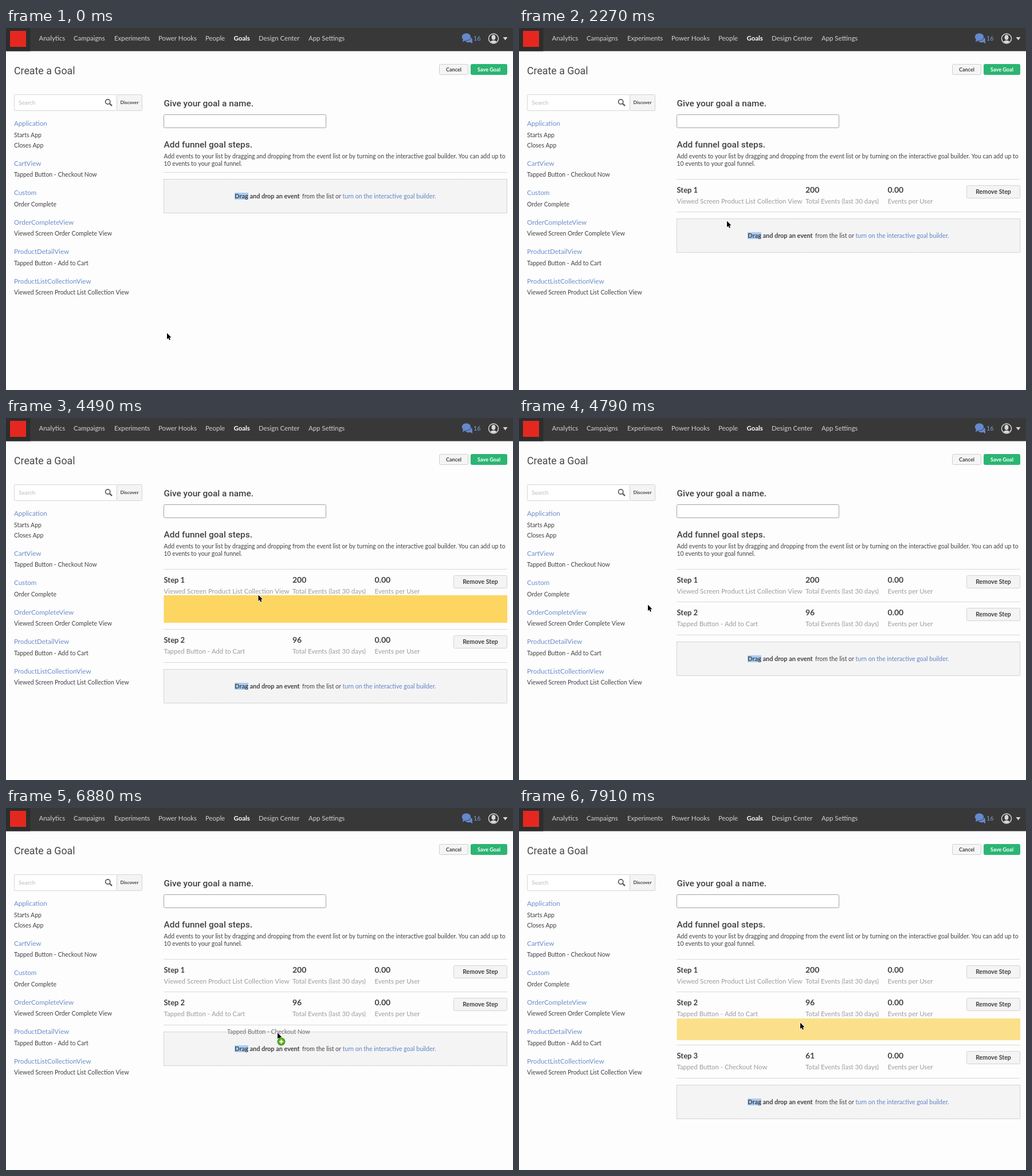
Recreate the animation shown at these times as an HTML page with a canvas. Size 885 by 633 pixels, loop 8000 ms.

```html
<!DOCTYPE html>
<html lang="en">
<head>
<meta charset="utf-8">
<title>Create a Goal</title>
<style>
html, body { margin: 0; width: 100%; height: 100%; overflow: hidden; background: #fdfdfd; }
canvas { display: block; width: 885px; height: 633px; }
</style>
</head>
<body>
<canvas id="stage"></canvas>
<script>
const W = 885, H = 633, LOOP = 8000;
const BEAT = 145; // the picture updates once per beat while something moves
const GAP = 48;   // full height of the opened slot
const canvas = document.getElementById('stage');
const ctx = canvas.getContext('2d');
const dpr = window.devicePixelRatio || 1;
canvas.width = W * dpr;
canvas.height = H * dpr;

const LATO = 'Lato, "Open Sans", sans-serif';
const ROBOTO = 'Roboto, "Liberation Sans", sans-serif';
const INK = '#414141', GREY = '#9c9c9c', LINK = '#5f83c6', RULE = '#d9d9d9';
const BODY = 10.45;

const LIST_VIEW = 'Viewed Screen Product List Collection View';
const ADD_CART = 'Tapped Button - Add to Cart';
const CHECKOUT = 'Tapped Button - Checkout Now';

const nav = [
  ['Analytics', 57.5], ['Campaigns', 118], ['Experiments', 189], ['Power Hooks', 266],
  ['People', 348], ['Goals', 397.5], ['Design Center', 441], ['App Settings', 528]
];
const sidebar = [
  ['Application', 'Starts App', 'Closes App'],
  ['CartView', CHECKOUT],
  ['Custom', 'Order Complete'],
  ['OrderCompleteView', 'Viewed Screen Order Complete View'],
  ['ProductDetailView', ADD_CART],
  ['ProductListCollectionView', LIST_VIEW]
];

// Each event is dragged from grab to drop, held at (dx, dy) from the pointer.
const steps = [
  { event: LIST_VIEW, total: 200, grab: 1240, drop: 1675, dx: -141, dy: -3 },
  { event: ADD_CART, total: 96, grab: 3460, drop: 4490, dx: -111.5, dy: 11 },
  { event: CHECKOUT, total: 61, grab: 5980, drop: 7900, dx: -87.5, dy: -1.5 }
];

// Pointer stops: reached in a number of beats, starting at a time.
const home = { x: 280.5, y: 533 };
const moves = [
  { at: 150, beats: 5, x: 155, y: 465 },
  { at: 1240, beats: 4, x: 489, y: 302 },
  { at: 2270, beats: 7, x: 106, y: 408 },
  { at: 3460, beats: 6, x: 440, y: 309 },
  { at: 4635, beats: 2, x: 224.5, y: 326 },
  { at: 4925, beats: 5, x: 101, y: 260 },
  { at: 5980, beats: 3, x: 320, y: 316 },
  { at: 6415, beats: 4, x: 473.5, y: 392.5 },
  { at: 7030, beats: 7, x: 490.5, y: 375 }
];

// The drop slot opens above step number `slot`.
const slots = [
  { open: 1385, close: 1675, slot: 0 },
  { open: 4040, close: 4635, slot: 1 },
  { open: 6270, close: 6705, slot: 1 },
  { open: 7030, close: 7900, slot: 2 }
];

const easeOut = p => 1 - Math.pow(1 - p, 2.6);

function pointerAt(t) {
  let pos = home;
  for (const m of moves) {
    if (t < m.at) break;
    const beat = Math.floor((t - m.at) / BEAT) + 1;
    const p = easeOut(Math.min(1, beat / m.beats));
    pos = { x: pos.x + (m.x - pos.x) * p, y: pos.y + (m.y - pos.y) * p };
  }
  return pos;
}

function gapAt(t, { open, close }) {
  if (t < open + BEAT) return GAP / 6;
  return t < close ? GAP : GAP * .73;
}

function text(str, x, y, size, color = INK, weight = 400, family = LATO, align = 'left') {
  ctx.font = `${weight} ${size}px ${family}`;
  ctx.fillStyle = color;
  ctx.textAlign = align;
  ctx.fillText(str, x, y);
}

function rect(x, y, w, h, color) {
  ctx.fillStyle = color;
  ctx.fillRect(x, y, w, h);
}

function panel(x, y, w, h, fill, stroke, radius = 1) {
  ctx.beginPath();
  ctx.roundRect(x + .5, y + .5, w - 1, h - 1, radius);
  ctx.fillStyle = fill;
  ctx.fill();
  ctx.strokeStyle = stroke;
  ctx.lineWidth = 1;
  ctx.stroke();
}

function button(label, x, y, w, h, size, fill = '#f4f4f4', stroke = '#d3d3d3', color = INK) {
  panel(x, y, w, h, fill, stroke, 2);
  text(label, x + w / 2, y + h / 2 + size * .34, size, color, 700, LATO, 'center');
}

function shape(points, color) {
  ctx.beginPath();
  points.forEach(([x, y]) => ctx.lineTo(x, y));
  ctx.closePath();
  ctx.fillStyle = color;
  ctx.fill();
}

function oval(x, y, rx, ry, color) {
  ctx.beginPath();
  ctx.ellipse(x, y, rx, ry, 0, 0, Math.PI * 2);
  ctx.fillStyle = color;
  ctx.fill();
}

function drawHeader() {
  const bar = '#383838', blue = '#6489cc', pale = '#d8d8d8';
  rect(0, 0, W, 40.5, bar);
  rect(0, 0, 42.5, 40.5, '#2d2d2d');
  rect(7, 5, 28, 28, '#e5281f');
  for (const [label, x] of nav) {
    const on = label === 'Goals';
    text(label, x, 22, 11.4, on ? '#fff' : '#d2d2d2', on ? 700 : 400);
  }

  oval(807.5, 20.5, 6.5, 5, blue);
  shape([[809, 23], [814, 22], [814, 27.5]], blue);
  oval(803.5, 15.5, 8.5, 7, bar);
  oval(803.5, 15.5, 7.7, 6.2, blue);
  shape([[798, 18], [803, 21], [797, 24.5]], blue);
  text('16', 816, 22, 10.8, '#7c9bd6');

  oval(851, 18.5, 9.3, 9.3, pale);
  oval(851, 18.5, 7.8, 7.8, bar);
  ctx.save();
  ctx.beginPath();
  ctx.arc(851, 18.5, 7.8, 0, Math.PI * 2);
  ctx.clip();
  oval(851, 16.5, 3.4, 4.4, pale);
  oval(851, 26, 6.3, 4.3, pale);
  ctx.restore();
  shape([[867.5, 16], [875.5, 16], [871.5, 21.5]], pale);
}

function drawSidebar() {
  text('Create a Goal', 14, 81, 17.8, '#484848', 400, ROBOTO);
  panel(14, 116, 180, 29, '#fff', '#d6d6d6');
  text('Search', 22, 134, 10, '#bcbcbc');
  button('Discover', 193, 116, 45, 29, 8.2);

  ctx.strokeStyle = '#5a5a5a';
  ctx.lineWidth = 1.7;
  ctx.beginPath();
  ctx.arc(177.7, 129, 4.1, 0, Math.PI * 2);
  ctx.stroke();
  ctx.lineWidth = 2.4;
  ctx.beginPath();
  ctx.moveTo(181, 132.3);
  ctx.lineTo(185, 136);
  ctx.stroke();

  let y = 167;
  for (const [title, ...events] of sidebar) {
    text(title, 14, y + 4, 11.6, '#6a8dcb');
    events.forEach((name, i) => text(name, 14, y + 23.7 + i * 18, BODY));
    y += 33.5 + events.length * 18;
  }
}

function drawForm() {
  button('Cancel', 756, 63, 51, 19, 9, '#f5f5f5', '#d0d0d0');
  button('Save Goal', 811, 63, 64, 19, 9.1, '#2bb573', '#2bb573', '#fff');

  text('Give your goal a name.', 275.5, 136.5, 15.4, INK, 500, ROBOTO);
  panel(275, 151, 284, 24, '#fff', '#a3a3a3', 2);
  text('Add funnel goal steps.', 275.5, 208.5, 15.4, INK, 500, ROBOTO);
  text('Add events to your list by dragging and dropping from the event list or by turning on the interactive goal builder. You can add up to', 275.5, 228, BODY);
  text('10 events to your goal funnel.', 275.5, 240.7, BODY);
}

function drawStep(i, y) {
  const { event, total } = steps[i];
  const columns = [
    [275.5, 'Step ' + (i + 1), event, 13],
    [500, total, 'Total Events (last 30 days)', 14],
    [643.5, '0.00', 'Events per User', 14]
  ];
  for (const [x, title, label, size] of columns) {
    text(title, x, y + 24.3, size, INK, 700);
    text(label, x, y + 42.7, 11.4, GREY);
  }
  button('Remove Step', 781, y + 11, 94, 23, 10.6);
}

function drawDropBox(y) {
  rect(275, y, 600, 60, '#f4f4f4');
  ctx.strokeStyle = '#c4c4c4';
  ctx.lineWidth = 1;
  ctx.setLineDash([2, 1]);
  ctx.strokeRect(275.5, y + .5, 599, 59);
  ctx.setLineDash([]);
  rect(399, y + 24, 24, 12, '#a9cdf6');
  text('Drag', 399.3, y + 34, 10.9, INK, 700);
  text('and drop an event', 425.5, y + 34, 10.9, INK, 700);
  text('from the list or', 517, y + 34, BODY);
  text('turn on the interactive goal builder.', 587.5, y + 34, 10.6, LINK);
}

function drawFunnel(t) {
  const count = steps.filter(s => t >= s.drop).length;
  if (!count) {
    rect(275, 252, 600, 1, RULE);
    drawDropBox(264);
    return;
  }
  const open = slots.find(s => t >= s.open && t < s.close + BEAT);
  const gap = open ? Math.round(gapAt(t, open)) : 0;
  const line = i => Math.floor(264 + i * 57.7);
  const shifted = i => line(i) + (open && i >= open.slot ? gap : 0);

  if (open) {
    ctx.globalAlpha = gap / GAP;
    rect(275.5, line(open.slot) - 11, 599.5, Math.round(12 + gap * .74), '#fdd561');
    ctx.globalAlpha = 1;
  }
  for (let i = 0; i <= count; i++) {
    rect(275, shifted(i), 600, 1, RULE);
    if (i < count) drawStep(i, shifted(i));
  }
  drawDropBox(shifted(count) + 12);
}

function drawPointer(x, y) {
  ctx.save();
  ctx.translate(x, y);
  ctx.lineJoin = 'round';
  ctx.strokeStyle = '#fff';
  ctx.lineWidth = 1.6;
  shape([[.5, .5], [.5, 11.2], [2.9, 9], [4.5, 12.8], [6.4, 12], [4.8, 8.3], [8, 8.2]], '#000');
  ctx.stroke();
  ctx.fill();
  ctx.restore();
}

function drawBadge(x, y) {
  oval(x, y, 7, 7, '#3f8f14');
  oval(x, y, 6.2, 6.2, '#55ad1d');
  rect(x - 3.5, y - 1, 7, 2, '#fff');
  rect(x - 1, y - 3.5, 2, 7, '#fff');
}

function draw(t) {
  const { x, y } = pointerAt(t);
  const held = steps.find(s => t >= s.grab && t < s.drop);

  ctx.setTransform(dpr, 0, 0, dpr, 0, 0);
  rect(0, 0, W, H, '#fdfdfd');
  drawHeader();
  drawSidebar();
  drawForm();
  drawFunnel(t);
  if (held) {
    ctx.globalAlpha = .75;
    text(held.event, x + held.dx, y + held.dy + 3.7, BODY);
    ctx.globalAlpha = 1;
  }
  drawPointer(x, y);
  if (held && x > 275) drawBadge(x + 7, y + 16);
}

const start = performance.now();
function loop() {
  draw((performance.now() - start) % LOOP);
  requestAnimationFrame(loop);
}
loop();
</script>
</body>
</html>
```
